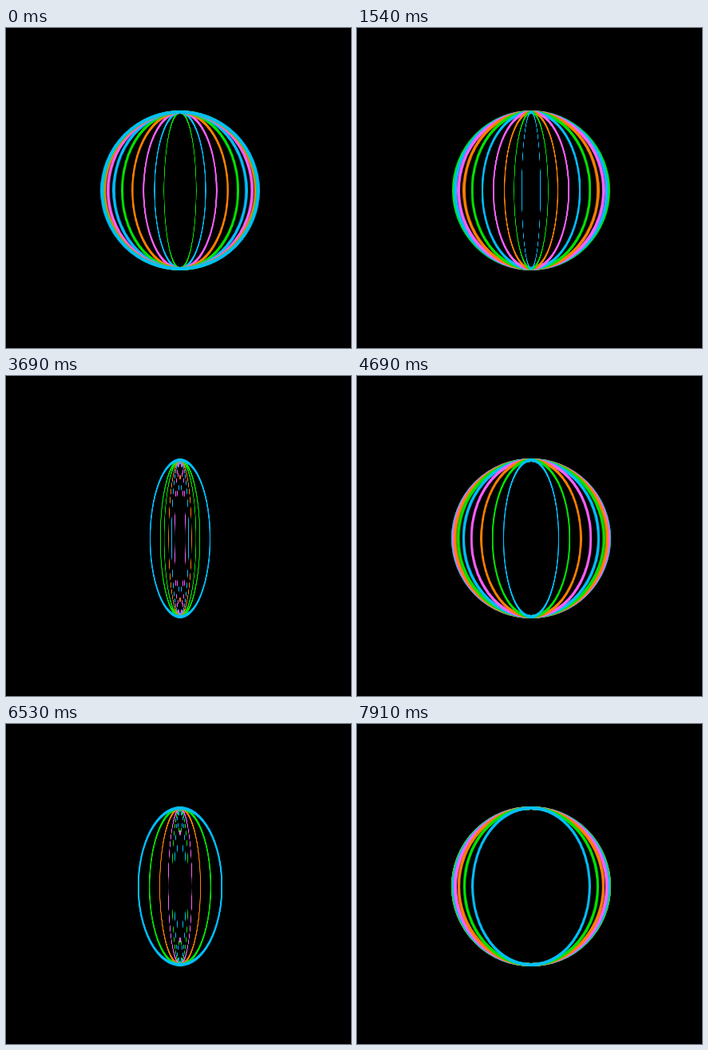
An HTML page that plays this animation: 432 px wide and 400 px high, repeating every 7.99 s.

```html
<!DOCTYPE html>
<html lang="en">
<head>
<meta charset="utf-8">
<title>Turning rings</title>
<style>
  html, body {
    margin: 0;
    width: 100%;
    height: 100%;
    overflow: hidden;
    background: #000;
  }
  .ring {
    position: absolute;
    left: 118px;
    top: 103px;
    box-sizing: border-box;
    width: 200px;
    height: 200px;
    border: 4px solid;
    border-radius: 50%;
    will-change: transform;
  }
</style>
</head>
<body>
<script>
  const COLORS = ['#00bfff', '#00e400', '#ff8000', '#ff5fff'];
  const RINGS = 10;
  const LOOP = 7990;
  const STEPS = 104;
  const STEP = LOOP / STEPS;
  const SWING = 1473;      // ms for one quarter turn
  const START = 1.15;      // phases are counted in swings
  const STAGGER = 0.0664;

  // cubic-bezier(.42, 0, .58, 1), solved by bisection
  function easeInOut(x) {
    let low = 0, high = 1;
    for (let i = 0; i < 24; i++) {
      const s = (low + high) / 2;
      if (s * (1.26 + s * (-0.78 + s * 0.52)) < x) low = s;
      else high = s;
    }
    return low * low * (3 - 2 * low);
  }

  // Edge-on at even phases, facing the viewer at odd ones
  function angleAt(phase) {
    const p = phase % 2;
    return 90 * (1 - easeInOut(p < 1 ? p : 2 - p));
  }

  // The first ring lies on top, so it is added last
  const rings = Array.from({ length: RINGS }, (_, i) => {
    const ring = document.createElement('div');
    ring.className = 'ring';
    ring.style.borderColor = COLORS[i % COLORS.length];
    document.body.prepend(ring);
    return ring;
  });

  function draw(time) {
    const step = Math.min(STEPS - 1, Math.floor((time % LOOP + 6) / STEP));
    const phase = START + step * STEP / SWING;
    rings.forEach((ring, i) => {
      ring.style.transform = `rotateY(${angleAt(phase + i * STAGGER).toFixed(3)}deg)`;
    });
  }

  const begin = performance.now();
  function tick() {
    draw(performance.now() - begin);
    requestAnimationFrame(tick);
  }
  tick();
</script>
</body>
</html>
```
